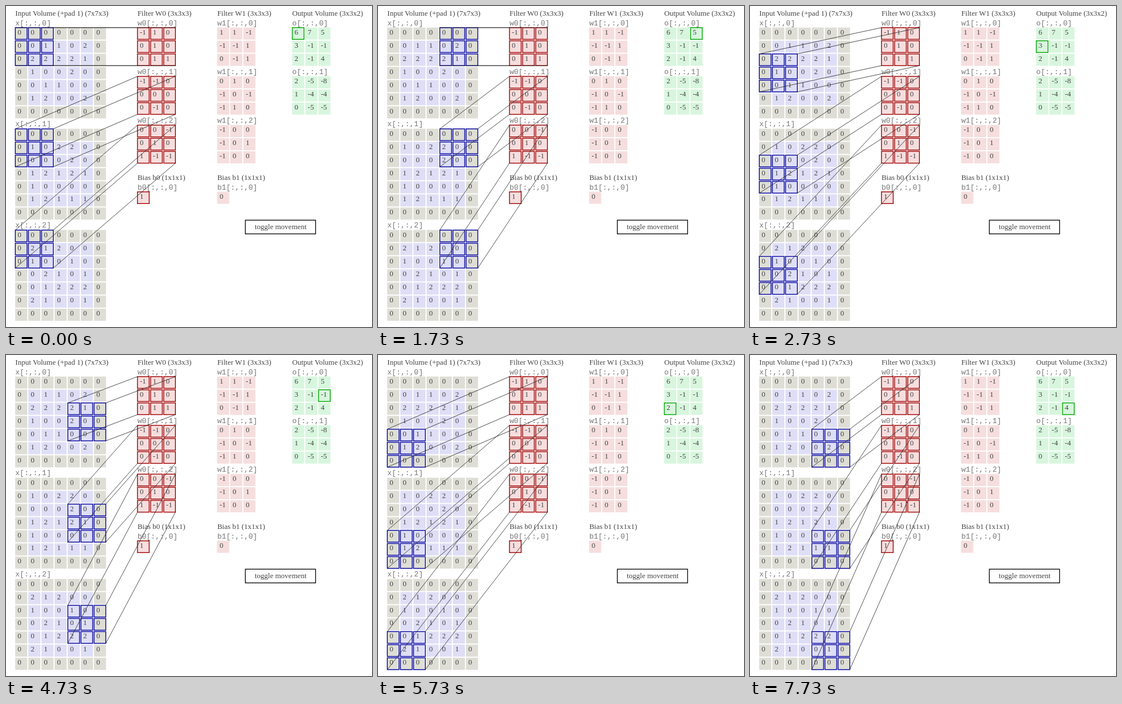
An HTML page that plays this animation: 640x561 px, repeating every 8 s.

```html
<!DOCTYPE html>
<html lang="en">
<head>
<meta charset="utf-8">
<style>
  html, body { margin: 0; height: 100%; overflow: hidden; background: #fff; }
  svg { display: block; width: 640px; height: 561px; }
  text { font: 13px "Liberation Serif", "Times New Roman", serif; fill: #444; white-space: pre; }
  .label { font-family: "Liberation Mono", "Courier New", monospace; fill: #777; }
  .box { fill: none; stroke-width: 1.4; }
  line { stroke: #222; stroke-width: .8; }
</style>
</head>
<body>
<svg viewBox="0 0 640 561"><g id="scene"></g><g id="marks"></g></svg>
<script>
const PITCH = 22.95, SIZE = 20.5, TOP = 37.8;
const X = { input: 16.3, w0: 229.9, w1: 369.4, out: 500.6 };
const STEP_Y = { input: 176.9, filter: 85.2 };
const FILL = { pad: '#deded6', input: '#dedef6', filter: '#f6dede', out: '#d8f6de' };

const inputs = [
  '0000000 0011020 0222210 0100200 0011000 0120020 0000000',
  '0000000 0102200 0000200 0121210 0100000 0121110 0000000',
  '0000000 0212000 0100100 0021010 0012220 0210010 0000000'
].map(m => m.split(' ').map(row => [...row]));

const matrices = list => list.map(m => m.split('/').map(row => row.split(' ')));
const w0 = matrices(['-1 1 0/0 1 0/0 1 1', '-1 -1 0/0 0 0/0 -1 0', '0 0 -1/0 1 0/1 -1 -1']);
const w1 = matrices(['1 1 -1/-1 -1 1/0 -1 1', '0 1 0/-1 0 -1/-1 1 0', '-1 0 0/-1 0 1/-1 0 0']);
const outputs = matrices(['6 7 5/3 -1 -1/2 -1 4', '2 -5 -8/1 -4 -4/0 -5 -5']);

const text = (x, y, s, cls = '') => `<text x="${x}" y="${y}" class="${cls}">${s}</text>`;
const rect = (x, y, size, attrs) =>
  `<rect x="${x}" y="${y}" width="${size}" height="${size}" ${attrs}/>`;
const box = (x, y, color) => rect(x, y, SIZE, `class="box" stroke="${color}"`);

function boxes3x3(x, y, color) {
  let s = '';
  for (let i = 0; i < 9; i++)
    s += box(x + i % 3 * PITCH, y + Math.floor(i / 3) * PITCH, color);
  return s;
}

function grid(x, y, label, rows, fill) {
  return text(x, y - 4.3, label, 'label') + rows.map((row, r) => row.map((value, c) => {
    const cx = x + c * PITCH, cy = y + r * PITCH;
    const color = typeof fill === 'function' ? fill(r, c) : fill;
    return rect(cx - .2, cy - .2, SIZE + .6, `fill="${color}"`) + text(cx + 4, cy + 12, value);
  }).join('')).join('');
}

function volume(x, title, name, list, stepY, fill) {
  return text(x, 17, title) +
    list.map((rows, d) => grid(x, TOP + d * stepY, `${name}[:,:,${d}]`, rows, fill)).join('');
}

function bias(x, name, value) {
  return text(x, 304, `Bias ${name} (1x1x1)`) +
    grid(x, 324.8, `${name}[:,:,0]`, [[value]], FILL.filter);
}

const inputFill = (r, c) => r % 6 && c % 6 ? FILL.input : FILL.pad;
const RED = '#a00000', BLUE = '#0000a0', GREEN = '#00a800';

document.getElementById('scene').innerHTML =
  volume(X.input, 'Input Volume (+pad 1) (7x7x3)', 'x', inputs, STEP_Y.input, inputFill) +
  volume(X.w0, 'Filter W0 (3x3x3)', 'w0', w0, STEP_Y.filter, FILL.filter) +
  volume(X.w1, 'Filter W1 (3x3x3)', 'w1', w1, STEP_Y.filter, FILL.filter) +
  volume(X.out, 'Output Volume (3x3x2)', 'o', outputs, STEP_Y.filter, FILL.out) +
  bias(X.w0, 'b0', 1) + bias(X.w1, 'b1', 0) +
  [0, 1, 2].map(d => boxes3x3(X.w0, TOP + d * STEP_Y.filter, RED)).join('') +
  box(X.w0, 324.8, RED) +
  '<rect x="418.5" y="374.3" width="122.9" height="24" fill="#fff" stroke="#000" stroke-width="1.3"/>' +
  text(435, 390, 'toggle movement');

// Window position 0..8, read row by row; the window moves two cells at a time.
function marks(position) {
  const r = Math.floor(position / 3), c = position % 3;
  const span = 2 * PITCH + SIZE;
  let s = box(X.out + c * PITCH, TOP + r * PITCH, GREEN);
  for (let d = 0; d < 3; d++) {
    const x = X.input + 2 * c * PITCH, y = TOP + d * STEP_Y.input + 2 * r * PITCH;
    const fy = TOP + d * STEP_Y.filter;
    s += boxes3x3(x, y, BLUE);
    for (const [dx, dy] of [[0, 0], [span, 0], [0, span], [span, span]])
      s += `<line x1="${x + dx}" y1="${y + dy}" x2="${X.w0 + dx}" y2="${fy + dy}"/>`;
  }
  return s;
}

const layer = document.getElementById('marks');
let shown = -1;
function frame() {
  const position = Math.floor((performance.now() % 8000 + 270) / 1000);
  if (position !== shown) layer.innerHTML = marks(shown = position);
  requestAnimationFrame(frame);
}
frame();
</script>
</body>
</html>
```
